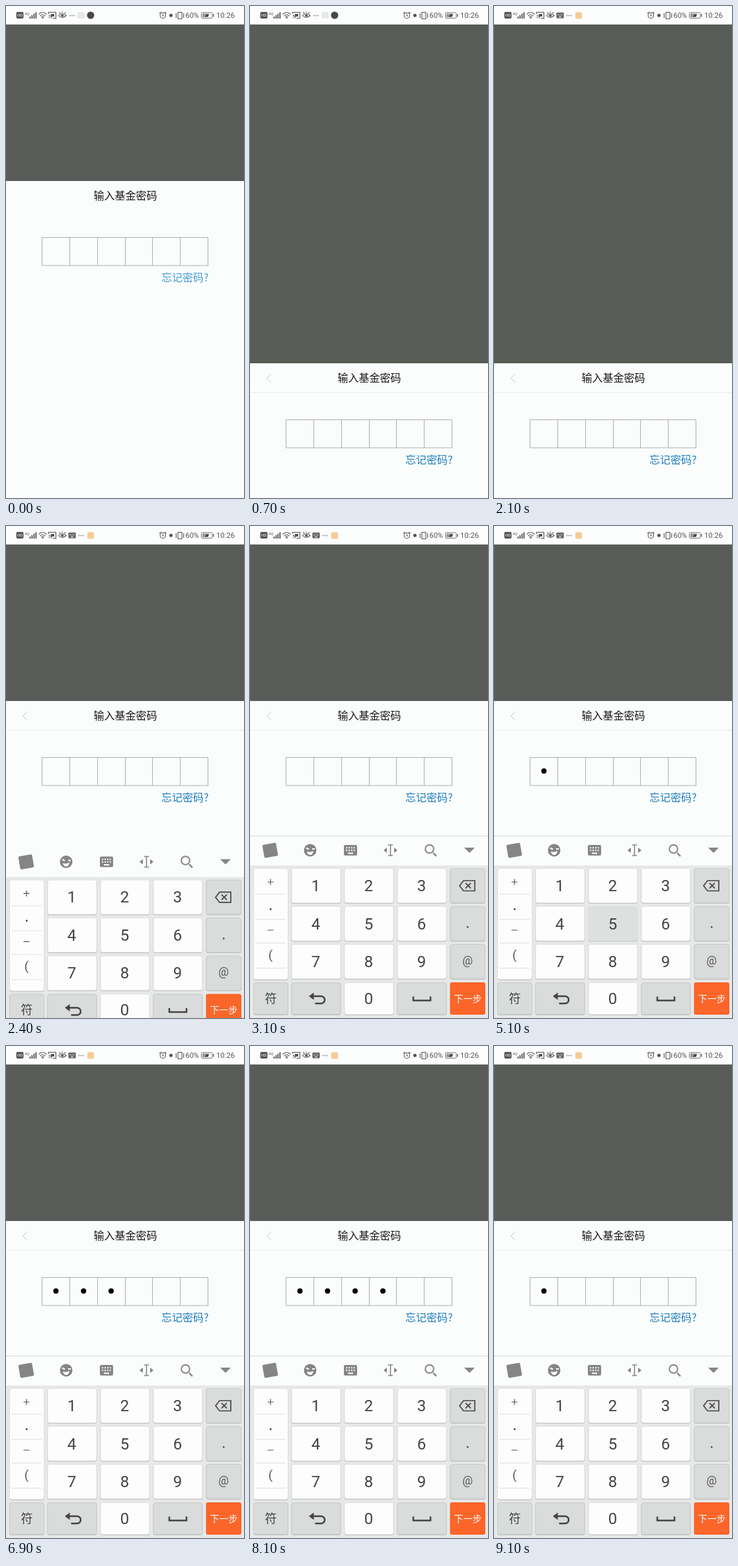
These frames come from a looping animation (360 by 745 pixels, 9.2 s). An HTML page:

```html
<!DOCTYPE html>
<html lang="zh-CN">
<head>
<meta charset="utf-8">
<style>
html, body { margin: 0; width: 100%; height: 100%; overflow: hidden; background: #fbfdfc; }
svg { display: block; width: 360px; height: 745px; font-family: "Noto Sans CJK SC", "Noto Sans CJK", sans-serif; }
.num { font-family: Roboto, sans-serif; }
.line { fill: none; stroke: #555; stroke-width: 1.1; }
.icon { fill: none; stroke: #444; stroke-width: 2; }
.mid { text-anchor: middle; }
</style>
</head>
<body>
<svg id="stage" viewBox="0 0 360 745">
  <rect id="shade" y="28" width="360" height="717"/>
  <g id="panel">
    <rect y="265" width="360" height="480" fill="#fbfdfc"/>
    <g id="head" fill="none">
      <path d="M32 281l-6.500 6.500 6.500 6.500" stroke="#ddd" stroke-width="1.300"/>
      <path d="M0 309.500h360" stroke="#e9ebea"/>
    </g>
    <text x="180.500" y="293" font-size="16" class="mid" fill="#151515">输入基金密码</text>
    <path d="M54.500 350.500h251v42.500h-251zM96.500 350v43M138.500 350v43M180.500 350v43M221.500 350v43M263.500 350v43" fill="none" stroke="#aeaeb0"/>
    <g id="dots"></g>
    <text id="link" x="235" y="417" font-size="16">忘记密码?</text>
  </g>
  <g id="board"></g>
  <g id="status"></g>
</svg>
<script>
const $ = id => document.getElementById(id);
const LOOP = 9200, DROP = 276, RISE = 2166, RISE_MS = 314;

// key, pressed from, released at
const presses = [
  ['4', 4000, 4200], ['5', 5000, 5200], ['6', 6100, 6300], ['7', 7100, 7300],
  ['del', 8150, 8300], ['del', 8550, 8700], ['del', 8950, 9100]
];

const rect = (x, y, w, h, fill, r = 0, more = '') =>
  `<rect x="${x}" y="${y}" width="${w}" height="${h}" rx="${r}" fill="${fill}" ${more}/>`;
const text = (x, y, size, s, fill = '#444', cls = 'mid') =>
  `<text x="${x}" y="${y}" font-size="${size}" fill="${fill}" class="${cls}">${s}</text>`;
const path = (d, cls = 'icon', more = '') => `<path d="${d}" class="${cls}" ${more}/>`;
const circle = (x, y, r, fill) => `<circle cx="${x}" cy="${y}" r="${r}" fill="${fill}"/>`;

function key(x, y, w, h, fill, id = '') {
  return rect(x, y + 1, w, h, '#c6c7c7', 3.5) +
    rect(x + .5, y + .5, w - 1, h - 1, fill, 3, `stroke="${fill === '#fdfdfd' ? '#e0e1e1' : '#c8c9c9'}" ${id && `id="k${id}"`}`);
}

function keyboardIcon(x, y, w, h, fill) {
  const u = w / 10;
  let s = rect(x, y, w, h, fill, u);
  for (let r = 0; r < 2; r++)
    for (let c = 0; c < 4; c++)
      s += rect(x + u * (1.6 + c * 1.9), y + h * (.2 + r * .25), u, u, '#fbfdfc');
  return s + rect(x + u * 3, y + h * .72, u * 4, u, '#fbfdfc');
}

function toolbar() {
  const g = '#858585';
  return rect(0, 469, 360, 45, '#fbfdfc') +
    path('M0 469.5h360', '', 'id="rule" stroke="#dcdddd"') +
    rect(20, 481, 21, 20, g, 2, 'transform="rotate(-10 31 491)"') +
    circle(91, 491, 9.5, g) +
    path('M85 487.500l4 2M94 489h4', '', 'stroke="#fff" stroke-width="2"') +
    path('M86 493q5 2 10-1q-1 6-5 6t-5-5z', '', 'fill="#fff"') +
    keyboardIcon(142, 483, 20, 16, g) +
    path('M209 483h7M209 499h7M212.500 483v16', '', `stroke="${g}" stroke-width="1.600"`) +
    path('M207 487v8l-5-4zM218 487v8l5-4z', '', `fill="${g}"`) +
    path('M277 495l5 5', '', `stroke="${g}" stroke-width="2.400"`) +
    `<circle cx="271.500" cy="489" r="6.300" fill="none" stroke="${g}" stroke-width="2"/>` +
    path('M324 487h16l-8 8z', '', `fill="${g}"`);
}

function buildBoard() {
  const white = '#fdfdfd', grey = '#dadbdb';
  const cols = [62.5, 142.5, 222.5], rows = [518, 575.5, 633, 691];
  let s = rect(0, 513, 360, 232, '#e7e8e8') + toolbar();

  s += key(5, 518, 53, 169, white);
  s += path('M8 557.500h46M8 595.500h46M8 631.500h46M8 669.500h46', '', 'stroke="#dedfdf"');
  s += path('M26.500 539h9M31 534.500v9M26.500 612h9', '', 'stroke="#555" stroke-width="1.200"');
  s += rect(30, 579, 2.5, 2.5, '#444') + text(31, 656, 19, '(', '#555', 'num mid');

  for (let i = 0; i < 9; i++) {
    const x = cols[i % 3], y = rows[i / 3 | 0];
    s += key(x, y, 75, 53, white, i + 1) + text(x + 37, y + 35, 24, i + 1, '#444', 'num mid');
  }
  s += key(142.5, 691, 75, 49, white) + text(179.5, 724, 24, '0', '#444', 'num mid');

  rows.slice(0, 3).forEach((y, i) => s += key(302.5, y, 53.5, 53, grey, i ? '' : 'del'));
  s += path('M323 537h17v15.500h-17l-6-7.700zM326 540.700l8 8M334 540.700l-8 8', 'icon', 'style="stroke-width:1.700"');
  s += rect(328, 606, 2.5, 2.5, '#555') + text(329, 664, 17.5, '@', '#555', 'num mid');

  s += key(5, 691, 53, 49, grey) + text(31.5, 722, 18, '符');
  s += key(62.5, 691, 75, 49, grey);
  s += path('M95 712h12.500a5.500 5.500 0 0 1 0 11h-9', 'icon', 'style="stroke-width:2.500"') +
    path('M89 712l7.500-5.500v11z', '', 'fill="#444"');
  s += key(222.5, 691, 75, 49, grey) + path('M247 712.500v6h26v-6', 'icon', 'style="stroke-width:2.500"');
  s += rect(302.5, 691, 53.5, 49, '#fb6529', 3) + text(329.5, 721, 14, '下一步', '#fff');
  return s;
}

function buildStatus() {
  const ink = '#555';
  let s = rect(0, 0, 360, 28, '#fcfdfd');
  s += rect(15.5, 9, 11, 10, ink, 2) + text(21, 16.3, 6, 'HD', '#fff', 'num mid');
  s += text(32, 13.5, 5.5, '4G', ink, 'num mid');
  for (let i = 0; i < 4; i++) s += rect(35.5 + i * 3, 16 - i * 2.2, 1.8, 3 + i * 2.2, ink);
  s += path('M49.500 12.500q6-5.500 12 0M51.500 15q4-3.500 8 0M53.500 17q2-1.800 4 0', 'line') + circle(55.5, 18.3, 1, ink);
  s += path('M64.500 12v-2.500h11v9h-5M64.500 14q4 .5 4.500 4.500M64.500 16.500q1.500 .5 2 2', 'line') + rect(68, 12, 5, 4, ink);
  s += path('M79.500 14.500q5.500-6 11.500 0q-6 6-11.500 0zM82 11l-1.500-1.500M85 10V8.500M88.500 11l1.500-1.500', 'line') + circle(85.2, 14.5, 2, ink);

  const three = x => [0, 3, 6].map(d => circle(x + d, 14.5, .9, '#888')).join('');
  s += `<g id="early">${three(97)}${rect(108, 9, 11, 10, '#e8e9e9', 2)}${circle(128, 14, 5.5, '#484848')}</g>`;
  s += `<g id="late">${keyboardIcon(94.5, 10, 11, 8.5, ink)}${three(110.5)}${rect(123, 9.5, 10, 10, '#f5cb93', 2)}</g>`;

  s += `<circle cx="237.300" cy="14.500" r="4.200" class="line"/>` + path('M237.300 12v3h2M232 11.500l2.500-2.500M242.500 11.500l-2.500-2.500', 'line');
  s += circle(249.5, 14.3, 2.5, ink);
  s += path('M260 9.500h6v10h-6zM257.300 11v7M268.700 11v7', 'line');
  s += text(271.5, 18, 11, '60%', ink, 'num');
  s += rect(295.5, 10, 16.5, 8.5, 'none', 1.5, 'stroke="#777"') + rect(297, 11.5, 9, 5.5, '#999') +
    rect(313, 12.3, 1.7, 4, '#777') + path('M301 16.500q0-4 6-4.500q0 5-6 4.500z', '', 'fill="#444"');
  return s + text(318, 18, 11.3, '10:26', ink, 'num');
}

$('board').innerHTML = buildBoard();
$('status').innerHTML = buildStatus();
$('dots').innerHTML = [75.5, 117.3, 159, 201].map(x => circle(x, 371, 4, '#000')).join('');

const show = (id, on) => $(id).style.display = on ? '' : 'none';

function draw(t) {
  const p = Math.min(1, Math.max(0, (t - RISE) / RISE_MS));
  const low = t >= 100 && t < RISE;
  $('shade').setAttribute('fill', low ? '#575d56' : '#5a5c59');
  $('panel').setAttribute('transform', `translate(0 ${low ? DROP : 0})`);
  $('board').setAttribute('transform', `translate(0 ${DROP * (1 - p) ** 2})`);
  $('link').setAttribute('fill', t < 100 ? '#459bd5' : '#1b7cc0');
  show('head', t >= 100);
  show('rule', p === 1);
  show('early', t < 2000);
  show('late', t >= 2000);

  let count = 0;
  const held = new Set();
  for (const [k, from, to] of presses) {
    if (t >= to) count += k === 'del' ? -1 : 1;
    else if (t >= from) held.add(k);
  }
  [...$('dots').children].forEach((d, i) => d.style.display = i < count ? '' : 'none');
  for (const [k] of presses)
    $('k' + k).style.fill = held.has(k) ? (k === 'del' ? '#c4c5c5' : '#dedfdf') : '';
}

const start = performance.now();
function tick(now) {
  draw(Math.max(0, now - start) % LOOP);
  requestAnimationFrame(tick);
}
draw(0);
requestAnimationFrame(tick);
</script>
</body>
</html>
```
